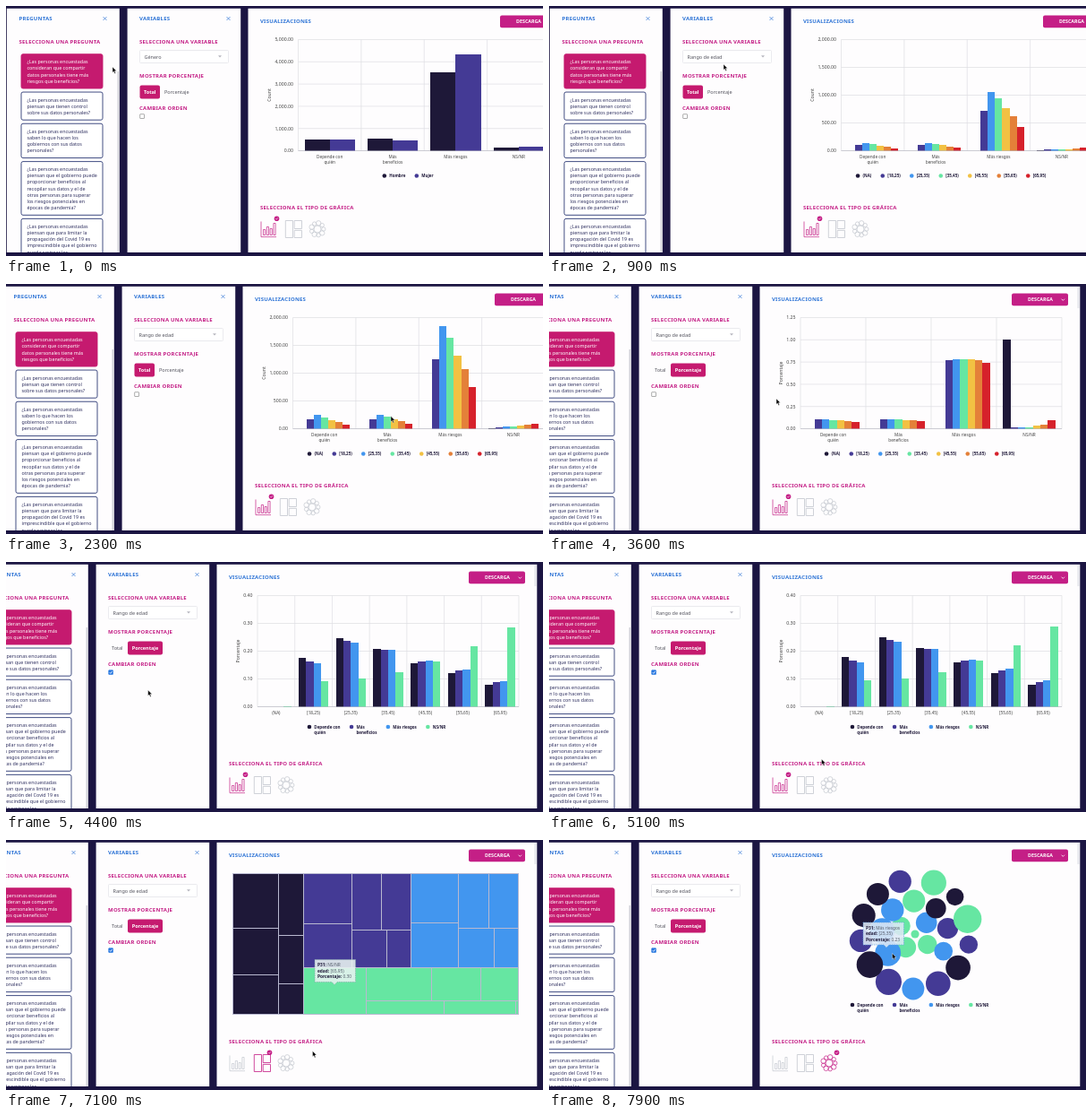
An HTML page that plays this animation: 600x279 px, repeating every 8 s.

```html
<!DOCTYPE html>
<html lang="es">
<head>
<meta charset="utf-8">
<style>
html, body { margin: 0; height: 100%; overflow: hidden; background: #1b1542; }
svg { display: block; width: 100vw; height: 100vh; font-family: "Noto Sans", "Open Sans", sans-serif; }
.h { font-size: 6px; font-weight: 700; letter-spacing: .22px; }
.b { font-weight: 700; }
.crisp { shape-rendering: crispEdges; }
</style>
</head>
<body>
<svg id="stage" viewBox="0 0 600 279"></svg>
<script>
const LOOP = 8000, STEP = 100;
const PINK = '#c51a6f', MAGENTA = '#c41f86', BLUE = '#2e74d6', INK = '#1e1838', GRAY = '#c3c7cf', NAVY = '#1b1542';
const COLORS = [INK, '#443a95', '#4296ef', '#66e6a2', '#f2c143', '#e48039', '#d6212b'];
const ANSWERS = ['Depende con|quién', 'Más|beneficios', 'Más riesgos', 'NS/NR'];
const AGES = ['(NA)', ...Array.from({ length: 6 }, (_, i) => `[${i ? 15 + i * 10 : 18},${i < 5 ? 25 + i * 10 : 95})`)];

// The answers follow one age profile, tilted towards the young; "NS/NR" grows with age.
const TOTALS = [980, 1015, 7870, 320], MEN = [.505, .545, .45, .4];
const PROFILE = [.159, .234, .208, .168, .137, .095], TILT = [.06, .02, 0];
const sum = a => a.reduce((p, v) => p + v, 0);
const normal = a => a.map(v => v / sum(a));
const transpose = m => m[0].map((_, i) => m.map(row => row[i]));
const GENDERS = TOTALS.map((n, i) => [n * MEN[i], n * (1 - MEN[i])]);
const COUNTS = TOTALS.map((n, i) => {
  const young = i < 3;
  const curve = PROFILE.map((p, j) => young ? p * (1 + TILT[i] * (2.5 - j)) : .1 + .0083 * j * j);
  return [young ? 0 : 1, ...normal(curve).map(v => v * n)];
});
const AGE_SHARE = transpose(transpose(COUNTS).map(normal));
const SHARES = COUNTS.map(normal);

const QUESTIONS = [
  '¿Las personas encuestadas|consideran que compartir|datos personales tiene más|riesgos que beneficios?',
  '¿Las personas encuestadas|piensan que tienen control|sobre sus datos personales?',
  '¿Las personas encuestadas|saben lo que hacen los|gobiernos con sus datos|personales?',
  '¿Las personas encuestadas|piensan que el gobierno puede|proporcionar beneficios al|recopilar sus datos y el de|otras personas para superar|los riesgos potenciales en|épocas de pandemia?',
  '¿Las personas encuestadas|piensan que para limitar la|propagación del Covid 19 es|imprescindible que el gobierno|pueda rastrear los|contactos?'
];

// moments of the clicks
const AGE = 900, SHARE = 3000, SWAP = 4200, TREE = 5700, BUBBLES = 7300;
const CURSOR = [[0, 119, 68], [AGE, 195, 65], [1800, 398, 144], [2300, 430, 147.5], [SHARE, 155, 95],
  [3600, 254, 128], [SWAP, 117, 121], [5100, 304.5, 220], [TREE, 286, 247], [6900, 369, 165],
  [7100, 342.5, 235.5], [BUBBLES, 313, 247], [7900, 383.5, 126.5]];
const SCROLL = [[2200, 0], [2300, 6], [2600, 35]];

const ease = v => 1 - (1 - Math.max(0, Math.min(1, v))) ** 3;

function track(keys, t) {
  const i = keys.findIndex(k => k[0] > t);
  if (i < 0) return keys.at(-1).slice(1);
  if (i === 0) return keys[0].slice(1);
  const [a, b] = [keys[i - 1], keys[i]], p = (t - a[0]) / (b[0] - a[0]);
  return a.slice(1).map((v, n) => v + (b[n + 1] - v) * p);
}

const rect = (x, y, w, h, fill, more = '') =>
  `<rect x="${x}" y="${y}" width="${w}" height="${h}" fill="${fill}" ${more}/>`;
const circle = (x, y, r, fill, more = '') => `<circle cx="${x}" cy="${y}" r="${r}" fill="${fill}" ${more}/>`;
const path = (d, color, w = .6) => `<path d="${d}" fill="none" stroke="${color}" stroke-width="${w}"/>`;
const text = (x, y, s, size, fill, more = '', lead = 6.5) => s.split('|').map((line, i) =>
  `<text x="${x}" y="${y + i * lead}" font-size="${size}" fill="${fill}" ${more}>${line}</text>`).join('');
const head = (x, y, s, fill = MAGENTA) => text(x, y, s, 6, fill, 'class="h"');
const MID = ' text-anchor="middle"', BOLD = 'class="b"';
const close = (x, y) => path(`M${x - 2} ${y - 2}l4 4m0-4l-4 4`, BLUE, .7);

function questions() {
  const lead = 7.15;
  let y = 53.7;
  return QUESTIONS.map((q, i) => {
    const h = q.split('|').length * lead + 9.7;
    const s = rect(17, y, 91, h, i ? '#fff' : PINK, `rx="2" stroke="${i ? '#2d3a75' : PINK}" stroke-width=".9"`) +
      text(23.5, y + 10.5, q, 5.35, i ? '#2f3060' : '#fff', '', lead);
    y += h + 4.05;
    return s;
  }).join('');
}

function variables(t) {
  const share = t >= SHARE, on = t >= SWAP;
  const option = (x, label, active, bx, w) => active
    ? rect(bx, 88.5, w, 15, PINK, 'rx="2"') + text(bx + w / 2, 98, label, 5.5, '#fff', BOLD + MID)
    : text(x, 98, label, 5.5, '#55555f');
  return head(149, 42.3, 'SELECCIONA UNA VARIABLE') +
    rect(149.5, 49.5, 99, 14, '#fff', 'rx="1" stroke="#e2e2e8" stroke-width=".7"') +
    text(154.5, 58.5, t < AGE ? 'Género' : 'Rango de edad', 5.5, '#55555f') +
    '<path d="M237 55.3h4l-2 2.2z" fill="#b5b5bd"/>' +
    head(149, 80.2, 'MOSTRAR PORCENTAJE') +
    option(153, 'Total', !share, 149.5, 22.5) + option(177, 'Porcentaje', share, 171, 39) +
    head(149, 116.3, 'CAMBIAR ORDEN') +
    rect(149.7, 120.7, 4.8, 4.8, on ? '#2878e0' : '#fff', `rx=".4" stroke="${on ? '#2878e0' : '#777'}" stroke-width=".6"`) +
    (on ? path('M150.7 123.2l1.1 1.2 1.8-2.4', '#fff', .8) : '');
}

const pen = document.createElement('canvas').getContext('2d');
pen.font = 'bold 45px "Noto Sans", "Open Sans", sans-serif';
const widest = s => Math.max(...s.split('|').map(line => pen.measureText(line).width / 10));

function legend(names, y) {
  const gap = 17.9, indent = 5.4, r = 2.3;
  const steps = names.map(n => gap + widest(n));
  let x = 449 - (sum(steps) - gap + indent - r) / 2;
  return names.map((n, i) => {
    const s = circle(x, y, r, COLORS[i]) + text(x + indent, y + 1.6, n, 4.5, INK, BOLD, 6);
    x += steps[i];
    return s;
  }).join('');
}

function barChart({ data, cats, names, legendY = 189.5, left = 316, max, step, title = 'Porcentaje', start }, t) {
  const top = 37.5, base = 161.5, right = 608, H = base - top;
  const cw = (right - left) / cats.length, bw = cw * .8 / names.length;
  const grow = ease((t - start + STEP) / 400);
  let s = '', bars = '';
  for (let v = 0; v < max + step / 2; v += step) {
    const y = base - v / max * H;
    s += path(`M${left} ${y}H${right}`, '#dedee3', .7) +
      text(left - 5.5, y + 1.8, v.toLocaleString('en-US', { minimumFractionDigits: 2, maximumFractionDigits: 2 }),
        5.2, '#444', 'text-anchor="end"');
  }
  for (let i = 0; i <= cats.length; i++) s += path(`M${left + i * cw} ${top}V${base}`, '#dedee3', .7);
  cats.forEach((c, i) => {
    data[i].forEach((v, j) => {
      const h = v / max * H * grow;
      bars += rect(left + (i + .1) * cw + j * bw, base - h, bw, h, COLORS[j]);
    });
    s += text(left + (i + .5) * cw, 169.8, c, 4.7, '#444', MID);
  });
  return s + `<g class="crisp">${bars}</g>` + path(`M${left} ${base}H${right}`, '#b9b9c4') +
    `<text transform="translate(296 99.5) rotate(-90)" font-size="5.2" fill="#444" ${MID}>${title}</text>` +
    legend(names, legendY);
}

// Each plan entry takes the next n values as a column (c) or a row (r).
function strips(values, [x, y, w, h], plan, color) {
  const rest = values.filter(v => v > 0).sort((a, b) => b - a);
  let s = '';
  for (const [dir, n] of plan.split(' ')) {
    const all = sum(rest), part = rest.splice(0, +n), share = sum(part) / all, col = dir === 'c';
    const sw = col ? w * share : w, sh = col ? h : h * share;
    let at = 0;
    for (const p of normal(part)) {
      s += rect(x + (col ? 0 : at * sw), y + (col ? at * sh : 0), col ? sw : sw * p, col ? sh * p : sh,
        color, 'stroke="#b9b9d0"');
      at += p;
    }
    if (col) { x += sw; w -= sw; } else { y += sh; h -= sh; }
  }
  return s;
}

function tooltip(x, y, tip, answer, age, value, fill, edge) {
  const rows = Object.entries({ P31: answer, edad: age, Porcentaje: value });
  return `<path d="M${x} ${y}h45.5v25H${tip + 3}l-3 3-3-3H${x}z" fill="${fill}" fill-opacity=".88" stroke="${edge}" stroke-width=".7" stroke-dasharray="1.5 1"/>` +
    rows.map(([k, v], i) => text(x + 3, y + 7.5 + i * 6.5,
      `<tspan class="b">${k}:</tspan> <tspan fill="#555d6b">${v}</tspan>`, 4.8, INK)).join('');
}

function treemap(t) {
  const x = 288, y = 37.5, w = 319.5, h = 157;
  const a = w / 4, b = (w - a) / 2, c = h * 2 / 3;
  const boxes = [[x, y, a, h], [x + a, y, b, c], [x + a + b, y, b, c], [x + a, y + c, w - a, h - c]];
  const plans = ['c3 c3', 'c2 r2 r2', 'c2 r2 r2', 'c1 r3 r3'];
  return `<g class="crisp" opacity="${ease((t - TREE + STEP) / 300)}">` +
    boxes.map((box, i) => strips(COUNTS[i], box, plans[i], COLORS[i])).join('') + '</g>' +
    (t >= 6700 ? tooltip(380, 133.5, 402, 'NS/NR', '[65,95)', '0.30', '#e9f3f1', '#8aa') : '');
}

// Rings of bubbles; each pair of digits names an answer and an age group.
const RINGS = [
  { items: '30', radius: 0, from: 0, step: 0 },
  { items: '25 32 33 31', radius: 18, from: -45, step: 85 },
  { items: '22 23 24 34 05 15 26', radius: 37, from: 145, step: 41 },
  { items: '35 06 36 16 03 13 21 12 02 11 01 04 14', radius: 61, from: -70, step: 27 }
];
function bubbles(t) {
  const k = ease((t - BUBBLES + STEP) / 500);
  const dots = RINGS.map(({ items, radius, from, step }) => items.split(' ').map(([answer, age], i) => {
    const a = (from + i * step) * Math.PI / 180, r = 3.3 + 23 * Math.sqrt(SHARES[answer][age]);
    return circle(444 + radius * k * Math.cos(a), 105 + radius * k * Math.sin(a), r * k, COLORS[answer]);
  }).join('')).join('');
  return dots + legend(ANSWERS, 184) +
    (t >= 7800 ? tooltip(386, 92, 412, 'Más riesgos', '[25,35)', '0.23', '#dde9f5', '#6aa5e0') : '');
}

const CHARTS = [
  { start: -LOOP, data: GENDERS, cats: ANSWERS, names: ['Hombre', 'Mujer'], left: 326.5, max: 5000, step: 1000, title: 'Count' },
  { start: AGE, data: COUNTS, cats: ANSWERS, names: AGES, left: 326.5, max: 2000, step: 500, title: 'Count' },
  { start: SHARE, data: AGE_SHARE, cats: ANSWERS, names: AGES, max: 1.25, step: .25 },
  { start: SWAP, data: transpose(SHARES), cats: AGES, names: ANSWERS, legendY: 184, max: .4, step: .1 }
];
const chart = t => t >= BUBBLES ? bubbles(t) : t >= TREE ? treemap(t) : barChart(CHARTS.findLast(c => t >= c.start), t);

function icons(t) {
  const active = t >= BUBBLES ? 2 : t >= TREE ? 1 : 0;
  const ink = i => i === active ? MAGENTA : GRAY;
  const bars = [6, 9, 7, 13].map((h, i) => `M${287.5 + i * 3.8} 255.5v${-h}h2.2v${h}z`).join('');
  const ring = `stroke="${ink(2)}" stroke-width=".7"`;
  let s = path('M285 240.5V257.7H302' + bars, ink(0), .7) +
    path('M312.3 239.5h8.2v19h-8.2zM322.2 239.5h8.3v9h-8.3zM322.2 250.4h8.3v8.1h-8.3z', ink(1), .8) +
    circle(348, 249, 4, 'none', ring);
  for (let i = 0; i < 9; i++) {
    const a = i * Math.PI * 2 / 9;
    s += circle(348 + 6.8 * Math.cos(a), 249 + 6.8 * Math.sin(a), 2.2 + i % 2 * .5, 'none', ring);
  }
  const x = 302.5 + active * 27;
  return s + circle(x, 237.3, 2.8, MAGENTA) + path(`M${x - 1.2} 237.3l.9 1 1.6-2`, '#fff', .6);
}

function scene(t) {
  const [dx] = track(SCROLL, t), [x, y] = track(CURSOR, t);
  const panel = (px, w) => rect(px, 2.5, w, 272.5, '#fefdfe');
  return rect(0, 0, 600, 279, NAVY) +
    `<clipPath id="page"><rect y="2.5" width="640" height="272.5"/></clipPath>
    <g transform="translate(${-dx} 0)"><g clip-path="url(#page)">` +
    panel(.8, 126) + panel(135.6, 126.6) + panel(270.5, 357.8) +
    head(14.5, 16.2, 'PREGUNTAS', BLUE) + close(110.5, 14) + head(14.5, 42.3, 'SELECCIONA UNA PREGUNTA') +
    questions() + rect(124.5, 73, 2, 202, '#d3d4da') +
    head(149, 16.2, 'VARIABLES', BLUE) + close(248.5, 14) + variables(t) +
    head(284, 19.2, 'VISUALIZACIONES', BLUE) +
    rect(552, 10.5, 63, 13.7, MAGENTA, 'rx="2"') + text(584, 19.2, 'DESCARGA', 5.3, '#fff', BOLD + MID) +
    path('M607.6 16.7l1.7 1.7 1.7-1.7', '#fff', .8) + rect(625.5, 3, 2, 24, '#e2e3e9') +
    chart(t) + head(284, 226.7, 'SELECCIONA EL TIPO DE GRÁFICA') + icons(t) + '</g></g>' +
    `<path transform="translate(${x} ${y})" d="M0 0v6.3l1.4-1.3 1.1 2.4 1-.5-1-2.3h2z" fill="#000" stroke="#fff" stroke-width=".4"/>`;
}

const stage = document.getElementById('stage'), origin = performance.now();
let shown = -1;
function tick() {
  const t = Math.floor((performance.now() - origin) % LOOP / STEP) * STEP;
  if (t !== shown) stage.innerHTML = scene(shown = t);
  requestAnimationFrame(tick);
}
tick();
</script>
</body>
</html>
```
